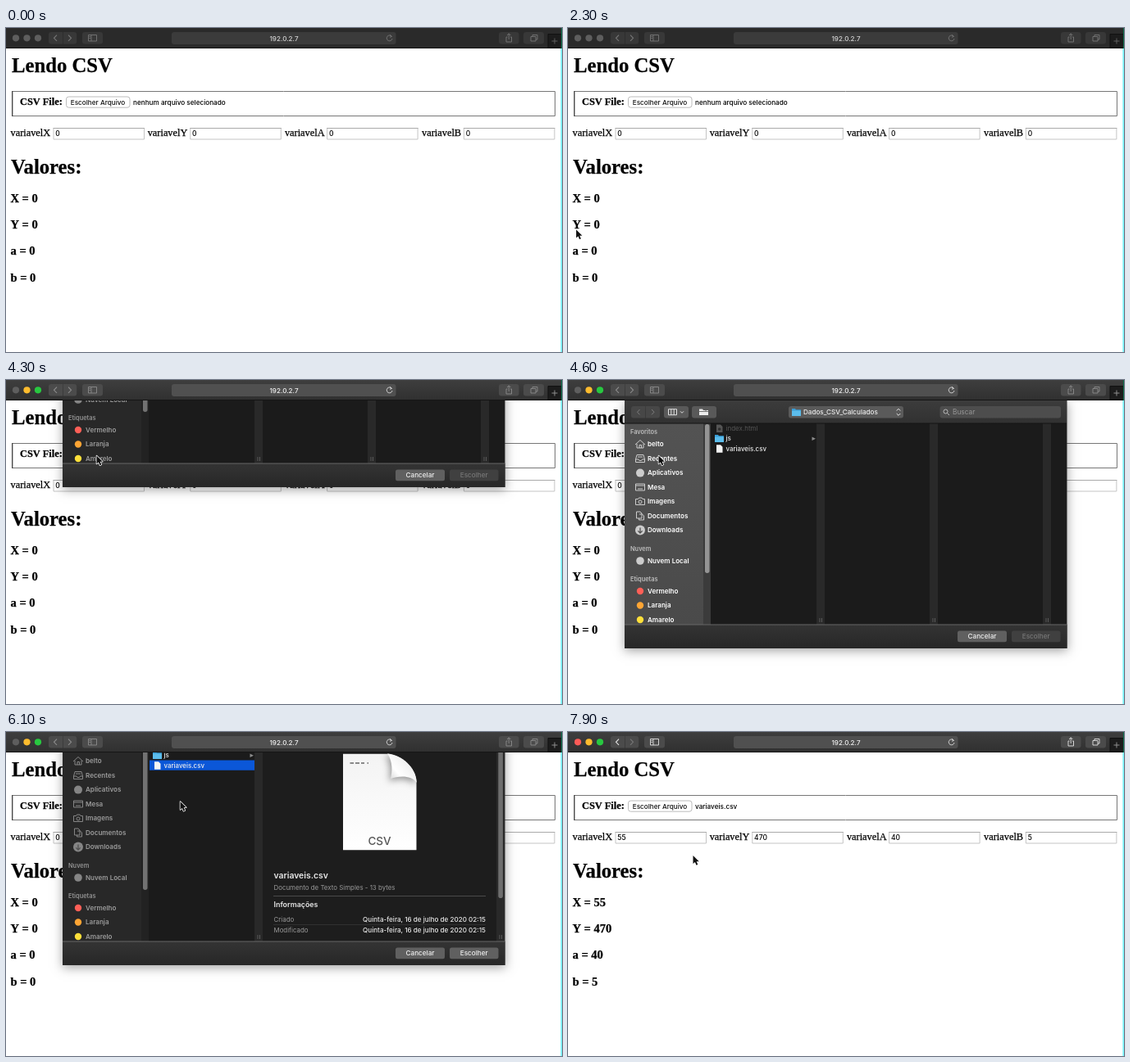
Animation of 678 by 396 pixels, one loop 8000 ms. Source, as an HTML page with a canvas:

```html
<!DOCTYPE html>
<html lang="pt-BR">
<head>
<meta charset="utf-8">
<title>Lendo CSV</title>
<style>
html, body { margin: 0; width: 100%; height: 100%; overflow: hidden; background: #fff; }
canvas { display: block; width: 678px; height: 396px; }
</style>
</head>
<body>
<canvas id="stage" width="678" height="396"></canvas>
<script>
const c = document.getElementById('stage').getContext('2d');
const LOOP = 8000, STEP = 100, BAR = 25;
const SERIF = '"Liberation Serif", "Times New Roman", serif';
const SANS = 'Inter, "Noto Sans", sans-serif';

// Pointer path: time, x, y
const path = [
  [700, 228, 333], [900, 93, 222], [1100, 104, 196], [1300, 132, 147],
  [1400, 165, 141], [1500, 199, 156], [1700, 120, 190], [1900, 40, 225],
  [2100, 2, 240], [2300, 10, 246.5], [2400, 46, 135], [2600, 60, 75],
  [2700, 74, 60], [2900, 110.5, 92.5], [4600, 110.5, 92.5], [4800, 122, 106],
  [5000, 131, 118], [5200, 165, 111], [5500, 212.5, 85], [7100, 212.5, 85],
  [7300, 219, 97], [7500, 205, 122], [7700, 175, 145], [7900, 152.5, 151]
];

function box(x, y, w, h, fill, r = 0, line) {
  c.beginPath();
  c.roundRect(x, y, w, h, r);
  if (fill) { c.fillStyle = fill; c.fill(); }
  if (line) { c.strokeStyle = line; c.lineWidth = 1; c.stroke(); }
}
function dot(x, y, r, fill) {
  c.beginPath();
  c.arc(x, y, r, 0, 7);
  c.fillStyle = fill;
  c.fill();
}
function stroke(d, color, width = 1) {
  c.strokeStyle = color;
  c.lineWidth = width;
  c.stroke(new Path2D(d));
}
function fill(d, color) {
  c.fillStyle = color;
  c.fill(new Path2D(d));
}
// A hairline outline gives the serif text its heavier ink
function serif(s, x, y, size, weight = 400) {
  c.font = `${weight} ${size}px ${SERIF}`;
  c.textAlign = 'left';
  c.fillStyle = c.strokeStyle = '#000';
  c.lineWidth = .25;
  c.fillText(s, x, y);
  c.strokeText(s, x, y);
}
// Sans text placed by the middle of its capitals
function sans(s, x, mid, size, color, weight = 400, align = 'left') {
  c.font = `${weight} ${size}px ${SANS}`;
  c.textAlign = align;
  c.fillStyle = color;
  c.fillText(s, x, mid + size * .36);
}
function shade(y, h, top, bottom) {
  const g = c.createLinearGradient(0, y, 0, y + h);
  g.addColorStop(0, top);
  g.addColorStop(1, bottom);
  return g;
}
const smooth = u => {
  u = Math.min(1, Math.max(0, u));
  return u * u * (3 - 2 * u);
};

function toolbar(t) {
  const active = t >= 3200, sheet = t >= 4200 && t < 6400;
  const icon = active && !sheet ? '#e4e4e4' : active ? '#8c8c8c' : '#777';
  const dim = active && !sheet ? '#777' : icon;
  const btn = active ? '#4b4b4b' : '#383838';
  box(0, 0, 678, BAR, active ? shade(0, BAR, '#3e3e3e', '#303030') : '#2a2a2a');
  box(0, 24, 678, 1, '#151515');
  const lights = active ? [sheet ? '#5e5e5e' : '#fc5b57', '#fdbc2e', '#28c840'] : Array(3).fill('#5e5e5e');
  lights.forEach((color, i) => dot(12 + i * 13.5, 12.3, 4.1, color));

  box(52, 5, 17, 14.5, btn, [3, 0, 0, 3]);
  box(69.7, 5, 16.5, 14.5, btn, [0, 3, 3, 0]);
  stroke('M62 8.7L58.5 12.3L62 15.9', icon, 1.1);
  stroke('M76 8.7L79.5 12.3L76 15.9', dim, 1.1);
  box(93, 5, 25, 14.5, btn, 3);
  stroke('M100.5 8.5H110.5V16H100.5ZM104 8.5V16M101.5 10.5H103M101.5 12.5H103', icon, .9);

  box(202, 5, 273.5, 15, active ? '#505050' : '#3b3b3b', 3);
  sans('192.0.2.7', 339, 12.6, 8.1, active ? '#f2f2f2' : '#d4d4d4', 500, 'center');
  stroke('M470.4 10.4A3.4 3.4 0 1 0 471 13M468.2 8.2L470.5 10.4L468 11.3', active ? '#ddd' : '#777', .9);

  box(601, 5, 24.5, 14.5, btn, 3);
  stroke('M611.5 11H610V17H616.5V11H615M613.2 14V7M611 9L613.2 6.8L615.4 9', icon, .9);
  box(631, 5, 25, 14.5, btn, 3);
  stroke('M640 10.5H646V16H640ZM642 10.5V8.5H648V14H646', icon, .9);
  box(661, 7.5, 17, 17, '#1c1c1c', 0, '#111');
  stroke('M669 12.5V19.5M665.5 16H672.5', active ? '#999' : '#666', .9);
  box(677, 0, 1, BAR, '#0b6b4a');
}

function page(t) {
  const loaded = t >= 6400;
  const vals = loaded ? [55, 470, 40, 5] : [0, 0, 0, 0];
  box(0, BAR, 678, 371, '#fff');
  serif('Lendo CSV', 7, 54, 24.7, 700);
  box(7.5, 77.5, 662, 30, null, 0, '#777');
  box(7, 77, 1.4, 31, '#4a4a4a');
  serif('CSV File:', 17, 93.7, 12.35, 700);

  const down = t >= 3700 && t < 3800;
  box(73.5, 84, 77.5, 13.2, down ? shade(84, 13, '#6aa9f8', '#1c6cf0') : '#fff', 3, down ? '#2b6fd6' : '#bcbcbc');
  sans('Escolher Arquivo', 112, 90.6, 8.2, down ? '#fff' : '#111', 500, 'center');
  sans(loaded ? 'variaveis.csv' : 'nenhum arquivo selecionado', 155, 90.6, 8.2, '#000', 500);

  'XYAB'.split('').forEach((name, i) => {
    const x = 58 + i * 166.8;
    serif('variavel' + name, 5.5 + i * 167.2, 132.3, 12.35);
    box(x, 122.5, 110.5, 13.5, '#fff', 0, '#c4c4c4');
    box(x - .5, 122, 111.5, 1, '#aaa');
    sans(String(vals[i]), x + 2.3, 129.3, 8.5, '#000', 500);
  });
  serif('Valores:', 6, 177.5, 24.7, 700);
  'XYab'.split('').forEach((name, i) => serif(`${name} = ${vals[i]}`, 5.5, 213.2 + i * 32.1, 14.5, 700));
  box(676.4, BAR, 1.6, 371, '#74f4fa');
}

function folder(x, y) {
  fill(`M${x} ${y}h4l1 1.3h6v7.7h-11Z`, '#3a9fd8');
  box(x, y + 2.4, 11, 6.6, '#5cbdec', .6);
}
function sheetOfPaper(x, y, color) {
  fill(`M${x} ${y}h5l2.5 2.5v7h-7.5Z`, color);
}

const places = [
  ['belto', 'M82 79L88 73.5L94 79M84 78V83H92V78M87 83V79.5H89.5V83'],
  ['Recentes', 'M84 91.5H92L93.5 97V100.5H82.5V97ZM82.5 97H86L87 98.5H89.5L90.5 97H93.5M85 94H91'],
  ['Aplicativos', null],
  ['Mesa', 'M82.5 127H93.5V135H82.5ZM82.5 129H93.5M85 133H91'],
  ['Imagens', 'M82.5 145.5H85.5L86.5 144H90L91 145.5H93.5V152.5H82.5ZM90 149A2 2 0 1 1 86 149A2 2 0 1 1 90 149'],
  ['Documentos', 'M83.5 161H88L90 163V169H83.5ZM87 164H90.5L92.5 166V171H86.5V169'],
  ['Downloads', null]
];

function sidebar(bright) {
  const text = bright ? '#fff' : '#9b9b9b', icon = bright ? '#ccc' : '#858585';
  const head = bright ? '#bdbdbd' : '#929292';
  const label = (name, y) => sans(name, 97, y, 8.05, text, 600);
  const title = (name, y) => sans(name, 76, y, 7.4, head, 600);
  box(69, 53, 96, 246, bright ? shade(53, 246, '#535353', '#4a4a4a') : '#282828');
  box(165, 53, 9, 246, bright ? '#3b3b3b' : '#222');
  box(167, 54, 5.5, 182, bright ? '#949494' : '#727272', 2.7);
  title('Favoritos', 63.5);
  places.forEach(([name, d], i) => {
    const y = 78.6 + i * 17.5;
    if (d) stroke(d, icon, 1);
    else dot(88, y, i === 2 ? 5 : 6, icon);
    label(name, y);
  });
  stroke('M88 180.5V187M85.3 184.4L88 187L90.7 184.4', '#505050', 1.3);
  title('Nuvem', 206);
  dot(88, 221, 4.8, icon);
  label('Nuvem Local', 221);
  title('Etiquetas', 243);
  [['Vermelho', '#ff5f57'], ['Laranja', '#ffa534'], ['Amarelo', '#ffdf3a']].forEach(([name, color], i) => {
    const y = 258 + i * 17.5;
    dot(88, y, 4.2, color);
    label(name, y);
  });
}

function grip(x) {
  stroke(`M${x - 1} 291V296M${x + 1.5} 291V296`, '#666', .8);
}

function csvPaper() {
  const paper = 'M411 69.5H466C482 71 500 86 500.7 104V187.6H411Z';
  c.save();
  c.clip(new Path2D(paper));
  fill(paper, shade(70, 118, '#f3f3f3', '#fff'));
  c.shadowColor = 'rgba(0,0,0,.4)';
  c.shadowBlur = 9;
  c.shadowOffsetX = -2;
  c.shadowOffsetY = 3;
  const curl = c.createLinearGradient(468, 101, 492, 80);
  curl.addColorStop(0, '#d8d8d8');
  curl.addColorStop(.4, '#fff');
  curl.addColorStop(1, '#eee');
  fill('M465 69C472 80 471 91 469 100C480 96 495 96 501 105V69Z', curl);
  c.restore();
  stroke('M419.5 81H424M426 81H431M433 81H437M440.5 81H442', '#666', 1.7);
  sans('CSV', 455.5, 176.3, 13.5, '#555', 500, 'center');
}

function preview() {
  box(313, 53, 295, 246, '#1d1d1d');
  box(598, 53, 10, 246, '#292929');
  box(600.3, 56, 5.6, 190, '#6e6e6e', 2.8);
  grip(603);
  csvPaper();
  sans('variaveis.csv', 326.5, 218.6, 10.4, '#e8e8e8', 600);
  sans('Documento de Texto Simples - 13 bytes', 326.5, 233.4, 7.9, '#999');
  box(326, 243, 259, 1, '#4a4a4a');
  sans('Informações', 326.5, 254, 8.9, '#e8e8e8', 600);
  box(326, 278, 259, 1, '#303030');
  ['Criado', 'Modificado'].forEach((name, i) => {
    const y = 271.7 + i * 13.4;
    sans(name, 326.5, y, 7.9, '#999');
    sans('Quinta-feira, 16 de julho de 2020 02:15', 585, y, 8.1, '#e8e8e8', 500, 'right');
  });
}

function files(chosen) {
  box(174, 53, 434, 246, '#1b1b1b');
  for (const x of [303, 441, 579]) {
    box(x, 53, 10, 246, '#292929');
    grip(x + 5);
  }
  if (chosen) {
    preview();
    box(175, 77.6, 128, 12.2, '#0b57d8');
  }
  sheetOfPaper(181, 54.5, '#555');
  dot(184.7, 60, 1.8, '#2f2f2f');
  sans('index.html', 192.5, 59.2, 8, '#555');
  folder(179, 67);
  sans('js', 192.5, 71.6, 8, '#eee', 500);
  fill('M297.5 69.5L302 71.8L297.5 74.1Z', '#8c8c8c');
  sheetOfPaper(181, 79.3, '#f4f4f4');
  sans('variaveis.csv', 192.5, 83.7, 7.9, '#eee', 500);
}

function sheetTop() {
  box(69, 25, 539, 28, shade(25, 28, '#3c3c3c', '#313131'));
  box(69, 52.5, 539, 1, '#151515');
  box(77, 32, 17, 14.5, '#474747', [3, 0, 0, 3]);
  box(94.7, 32, 17.3, 14.5, '#474747', [0, 3, 3, 0]);
  stroke('M87.5 36L84.5 39.2L87.5 42.4M102 36L105 39.2L102 42.4', '#7d7d7d', 1);
  box(117, 32, 30, 14.5, '#595959', 3);
  stroke('M122.5 35.7H132.5V42.7H122.5ZM125.8 35.7V42.7M129.2 35.7V42.7M137 38.3L139 40.3L141 38.3', '#e0e0e0', 1);
  box(151, 32, 30, 14.5, '#595959', 3);
  fill('M160 35.5H164L165 37H171V43H160Z', '#ececec');
  stroke('M160 38.5H171M168 34V38', '#595959', .8);
  box(269, 32, 140, 14.5, '#5a5a5a', 3);
  folder(273, 35);
  sans('Dados_CSV_Calculados', 287, 39.4, 8.1, '#eee', 500);
  stroke('M400.7 37.5L403 35.2L405.3 37.5M400.7 41L403 43.3L405.3 41', '#e6e6e6', 1);
  box(453.5, 32, 147.5, 14.5, '#4d4d4d', 3);
  stroke('M463 38.5A2.5 2.5 0 1 1 458 38.5A2.5 2.5 0 1 1 463 38.5M462.4 40.4L465 43', '#bbb', 1);
  sans('Buscar', 469, 39.4, 8.3, '#999');
}

function button(x, w, label, color, text) {
  box(x, 306.6, w, 13.7, color, 2.5);
  sans(label, x + w / 2, 313.5, 8.2, text, 500, 'center');
}

function dialog(t) {
  const open = smooth((t - 4145) / 390), shut = smooth((t - 6017) / 350);
  const shown = open - shut;
  if (t < 4200 || shown <= 0) return;
  const chosen = t >= 5800, closing = t > 6000;
  c.save();
  c.beginPath();
  c.rect(0, BAR, 676, 371);
  c.clip();
  c.translate(0, Math.round((shown - 1) * 303));
  c.shadowColor = 'rgba(0,0,0,.36)';
  c.shadowBlur = 12;
  c.shadowOffsetY = 3;
  box(69, 25, 539.5, 303, '#2a2a2a');
  c.shadowColor = 'transparent';
  files(chosen);
  sidebar(t >= 4500 && !closing);
  sheetTop();
  box(69, 299, 539.5, 29, shade(299, 29, '#343434', '#272727'));
  box(69, 298.5, 539.5, 1, '#666');
  button(475, 60, 'Cancelar', '#606060', '#f0f0f0');
  if (closing) button(541, 59.5, 'Escolher', '#606060', '#f0f0f0');
  else if (chosen) button(541, 59.5, 'Escolher', '#1662dc', '#fff');
  else button(541, 59.5, 'Escolher', '#404040', '#777');
  c.restore();
}

function pointer(t) {
  if (t < path[0][0]) return;
  const i = path.findIndex(p => p[0] > t);
  let [t0, x, y] = path.at(i < 0 ? -1 : i - 1);
  if (i > 0) {
    const [t1, x1, y1] = path[i], u = (t - t0) / (t1 - t0);
    x += (x1 - x) * u;
    y += (y1 - y) * u;
  }
  c.save();
  c.translate(x, y);
  const arrow = 'M0 0V10L2.4 7.9L4 11.7L5.8 10.9L4.2 7.3H7.3Z';
  c.lineJoin = 'round';
  stroke(arrow, '#fff', 1.5);
  fill(arrow, '#111');
  c.restore();
}

function draw(now) {
  const t = Math.floor(now % LOOP / STEP) * STEP;
  page(t);
  toolbar(t);
  dialog(t);
  pointer(t);
}

let start;
function tick(now) {
  start ??= now;
  draw(now - start);
  requestAnimationFrame(tick);
}
draw(0);
requestAnimationFrame(tick);
</script>
</body>
</html>
```
